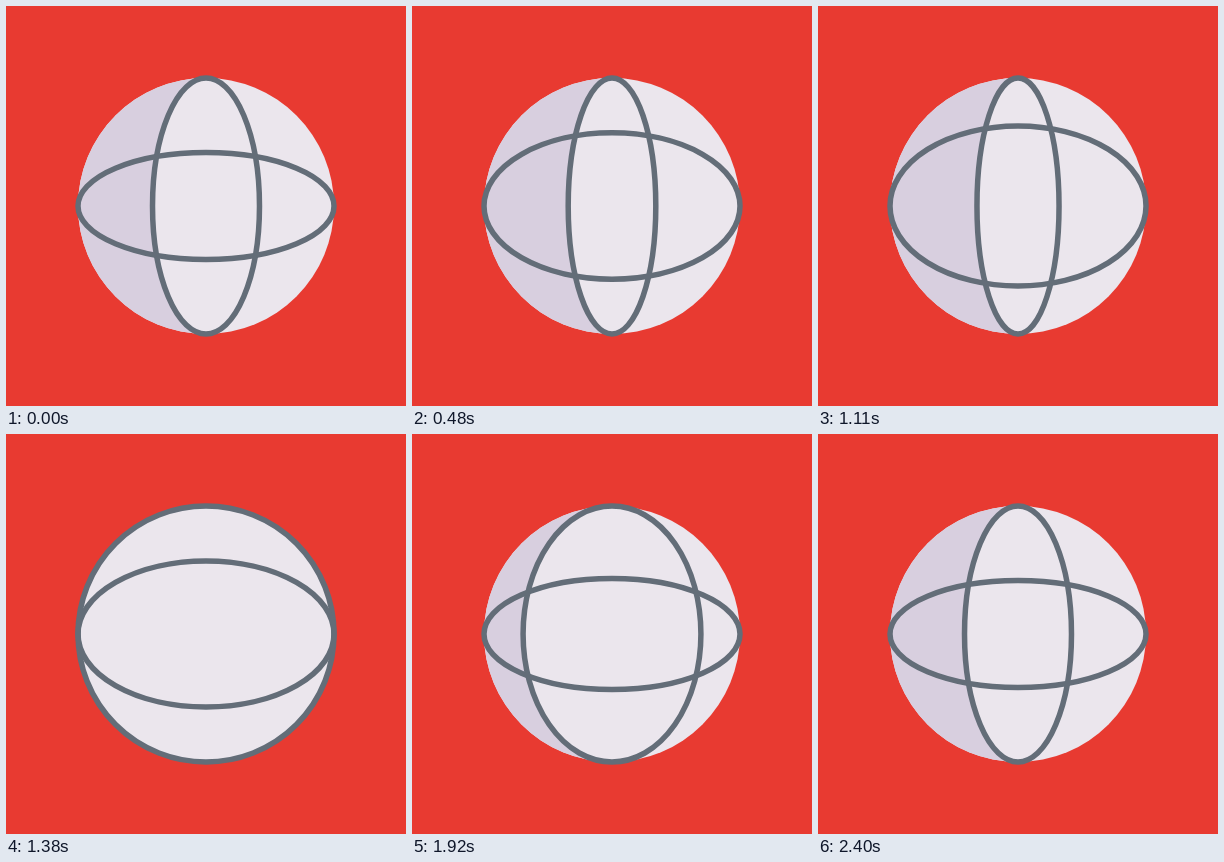
An HTML page that plays this animation: 400x400 px, repeating every 4.46 s.

```html
<!DOCTYPE html>
<html lang="en">
<head>
<meta charset="utf-8">
<title>Spinning globe</title>
<style>
  html, body { margin: 0; width: 100%; height: 100%; overflow: hidden; background: #e83a31; }
  svg { display: block; width: 100%; height: 100%; }
  .light { fill: #ebe6ed; }
  .dark { fill: #d8cfdf; }
  .line { fill: none; stroke: #636d78; stroke-width: 5.5; }
</style>
</head>
<body>
<svg viewBox="0 0 400 400">
  <circle class="light" cx="200" cy="200" r="128"/>
  <path class="dark" d="M200 72A128 128 0 0 0 200 328Z"/>
  <ellipse class="light" id="lit" cx="200" cy="200" ry="128"/>
  <ellipse class="line" id="meridian" cx="200" cy="200" ry="128"/>
  <ellipse class="line" id="equator" cx="200" cy="200" rx="128"/>
</svg>
<script>
  const LOOP = 4460, MOVE = 2400, STEP = 30, R = 128;
  const [lit, meridian, equator] = ['lit', 'meridian', 'equator']
    .map(id => document.getElementById(id));

  // Smooth curve through [ms, degrees] keys, with a given slope at each end.
  function curve(keys, startSlope, endSlope) {
    const rate = i => (keys[i + 1][1] - keys[i][1]) / (keys[i + 1][0] - keys[i][0]);
    const slopes = keys.map(([t], i) => {
      if (i === 0) return startSlope;
      if (i === keys.length - 1) return endSlope;
      const before = t - keys[i - 1][0], after = keys[i + 1][0] - t;
      return (rate(i - 1) * after + rate(i) * before) / (before + after);
    });
    return t => {
      let i = 0;
      while (i < keys.length - 2 && t >= keys[i + 1][0]) i++;
      const [t0, a] = keys[i], [t1, b] = keys[i + 1];
      const span = t1 - t0, u = (t - t0) / span, v = 1 - u;
      return a * v * v * (1 + 2 * u) + b * u * u * (3 - 2 * u)
        + span * u * v * (slopes[i] * v - slopes[i + 1] * u);
    };
  }

  // One full turn that winds up first, then swings past its rest angle.
  const spin = curve([[0, 24.7], [270, 5.8], [750, 66.6], [1110, 161.3],
    [1380, 270], [1920, 404], [2400, 384.7]], -0.08, 0);
  const tilt = curve([[0, 24.7], [270, 30], [750, 39.6], [1110, 38.7],
    [1380, 34.8], [1920, 25.7], [2400, 24.7]], 0.015, 0);

  const radius = deg => (R * Math.abs(Math.sin(deg * Math.PI / 180))).toFixed(2);

  function draw(ms) {
    const t = Math.min(MOVE, Math.floor(ms % LOOP / STEP) * STEP);
    const rx = radius(spin(t));
    lit.setAttribute('rx', rx);
    meridian.setAttribute('rx', rx);
    equator.setAttribute('ry', radius(tilt(t)));
  }

  const start = performance.now();
  function tick() {
    draw(performance.now() - start);
    requestAnimationFrame(tick);
  }
  tick();
</script>
</body>
</html>
```
